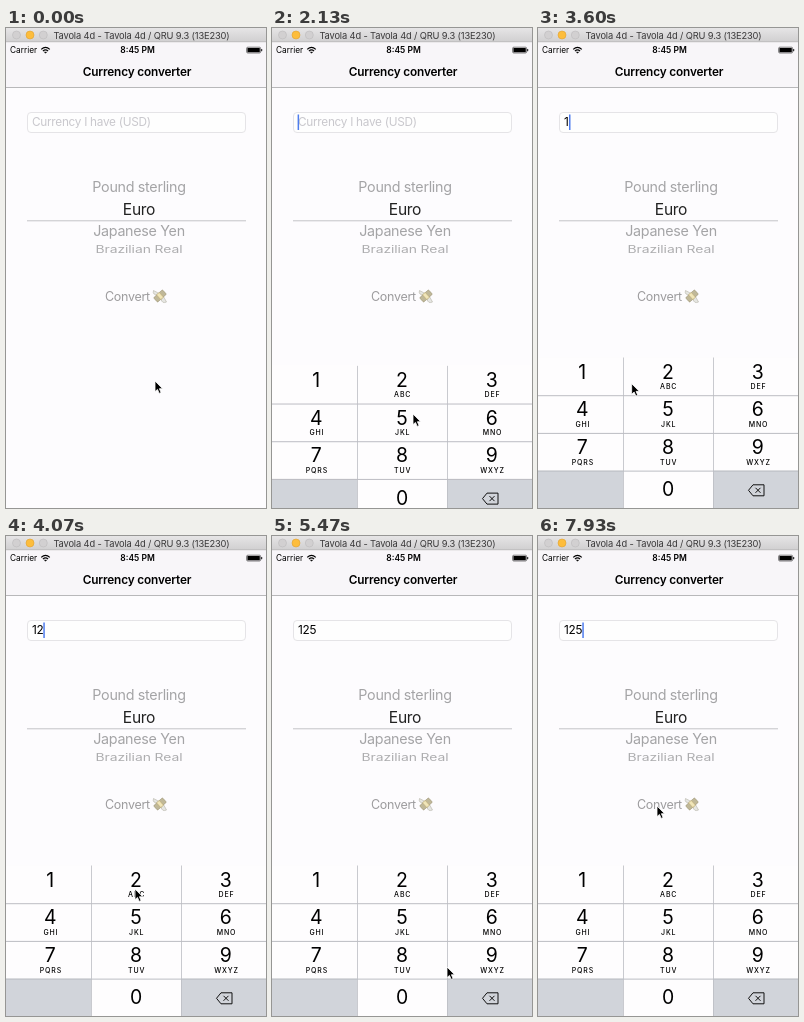
An HTML page for the animation above (8000 ms loop, 260 by 480 pixels).

```html
<!DOCTYPE html>
<html lang="en">
<head>
<meta charset="utf-8">
<title>Currency converter</title>
<style>
html, body { margin: 0; width: 100%; height: 100%; overflow: hidden; background: #fdfcfe; }
svg { display: block; width: 260px; height: 480px; font-family: Inter, Roboto, sans-serif; }
.mid { text-anchor: middle; }
.pick { font-size: 14.3px; letter-spacing: -.3px; fill: #a4a4a6; }
.body { font-size: 11.8px; letter-spacing: -.29px; }
.digit { font-size: 19.4px; }
.letters { font-size: 7px; font-weight: 500; letter-spacing: .85px; }
</style>
</head>
<body>
<svg viewBox="0 0 260 480">
  <defs>
    <linearGradient id="chrome" x2="0" y2="1">
      <stop stop-color="#e6e5e6"/><stop offset="1" stop-color="#d0cfd0"/>
    </linearGradient>
  </defs>
  <rect width="260" height="480" fill="#fdfcfe"/>

  <!-- window and navigation bars -->
  <rect y="14" width="260" height="45" fill="#f8f6f9"/>
  <rect y="59" width="260" height="1" fill="#b8b8ba"/>
  <rect width="260" height="14" fill="url(#chrome)"/>
  <rect y="13.5" width="260" height=".7" fill="#b4b3b4"/>
  <g stroke-width=".6">
    <circle cx="10.5" cy="7" r="4" fill="#d2d0d1" stroke="#bdbbbc"/>
    <circle cx="24" cy="7" r="4" fill="#fdbd3c" stroke="#dfa133"/>
    <circle cx="37.3" cy="7" r="4" fill="#d2d0d1" stroke="#bdbbbc"/>
  </g>
  <text class="mid" x="135.5" y="10.8" font-size="9.3" letter-spacing="-.14" fill="#3a393a">Tavola 4d - Tavola 4d / QRU 9.3 (13E230)</text>
  <text x="4" y="25" font-size="8.3">Carrier</text>
  <g fill="none" stroke="#000" stroke-width="1.2">
    <path d="M35.2 21.4Q39.5 17.5 43.8 21.4M36.9 23.1Q39.5 20.7 42.1 23.1"/>
    <path d="M38.4 24.1L39.5 25.2L40.6 24.1Z" fill="#000" stroke-width=".5"/>
  </g>
  <text class="mid" x="131.5" y="25" font-size="8.5" font-weight="600">8:45 PM</text>
  <rect x="240.6" y="19.2" width="14" height="5.8" rx="1.2" fill="#f8f6f9" stroke="#000" stroke-width=".5"/>
  <rect x="241.4" y="20" width="12.4" height="4.2" rx=".5"/>
  <rect x="255.2" y="21" width="1" height="2.2" rx=".5"/>
  <text class="mid" x="131" y="48.2" font-size="11.8" font-weight="600" letter-spacing="-.15">Currency converter</text>

  <!-- amount field -->
  <rect x="21.5" y="84.5" width="218" height="20" rx="3.5" fill="#fefefe" stroke="#e5e4e7"/>
  <text id="amount" class="body" x="26" y="98.4"></text>
  <rect id="caret" y="86.5" width="1.5" height="15.5" fill="#4f7dee"/>

  <!-- currency picker -->
  <text class="mid pick" x="133" y="164.3">Pound sterling</text>
  <text class="mid" x="133" y="186.5" font-size="15.6" letter-spacing="-.3" fill="#222">Euro</text>
  <rect x="21" y="192.3" width="219" height="1" fill="#c4c3c8"/>
  <text class="mid pick" x="133" y="208">Japanese Yen</text>
  <text class="mid pick" transform="translate(133 225.4) scale(1 .72)" style="font-size:13.9px;letter-spacing:-.08px;fill:#adadaf">Brazilian Real</text>

  <text x="99" y="272.6" font-size="12.5" letter-spacing="-.3" fill="#9d9c9e">Convert</text>
  <g transform="translate(154 268)" stroke-width=".5">
    <path d="M-2-1Q-8-1-6.5-5.5Q-3-4 1-1ZM1 3Q2 8 6.5 6Q5 3 3 0Z" fill="#e6e6e2" stroke="#a9a698"/>
    <g transform="rotate(-42)">
      <rect x="-6" y="-3" width="12" height="6" rx=".8" fill="#c0b898" stroke="#958d70"/>
      <rect x="-1.8" y="-3.2" width="3.6" height="6.4" fill="#f0e5b8" stroke="#bda970"/>
    </g>
  </g>

  <g id="pad"></g>
  <path id="pointer" d="M0 0V10.6L2.5 8.4L4.2 12.4L6.1 11.6L4.4 7.7H7.6Z" fill="#000" stroke="#fff" stroke-width=".8" stroke-linejoin="round"/>
</svg>
<script>
const $ = id => document.getElementById(id);
const FRAME = 200 / 3, COUNT = 120;
const PAD_TOP = 329.5, PAD_HEIGHT = 151, ROW = 37.7, EDGES = [0, 85, 175, 260];
const LETTERS = ['', 'ABC', 'DEF', 'GHI', 'JKL', 'MNO', 'PQRS', 'TUV', 'WXYZ'];

// Pointer path: frame, x, y
const PATH = [
  [0, 149, 353], [1, 148, 358], [6, 148, 358], [8, 141, 386], [40, 141, 386],
  [46, 76, 357], [53, 76, 357], [56, 129, 353], [65, 129, 353], [69, 129, 387],
  [73, 130, 386], [78, 181, 431], [80, 184, 430], [82, 175, 431], [84, 175, 431],
  [91, 144, 268], [93, 144, 268], [97, 119, 270], [120, 119, 270]
];
// Each key lights one frame before its digit appears
const TYPED = [[51, 1], [60, 2], [72, 5]];
const CARET_X = [25.6, 31, 37.3, 44.3];

function buildPad() {
  const rect = (x, y, w, h, fill, id = '') =>
    `<rect ${id && `id="${id}"`} x="${x}" y="${y}" width="${w}" height="${h}" fill="${fill}"/>`;
  const label = (kind, x, y, s) => `<text class="mid ${kind}" x="${x}" y="${y}">${s}</text>`;
  const mids = [44.2, 130, 219.8];
  let out = rect(0, 0, 260, PAD_HEIGHT, '#fefdfe');
  for (const x of [0, 175]) out += rect(x, 3 * ROW, 85, ROW, '#d1d4da');
  LETTERS.forEach((text, i) => {
    const col = i % 3, row = Math.floor(i / 3), y = row * ROW;
    out += rect(EDGES[col], y, EDGES[col + 1] - EDGES[col], ROW, 'none', 'key' + (i + 1));
    out += label('digit', mids[col], y + 21, i + 1) + label('letters', mids[col] + .7, y + 31.6, text);
  });
  out += label('digit', 130, 138.8, 0);
  for (const x of [85, 175]) out += rect(x, 0, .8, PAD_HEIGHT, '#bcbdc3');
  for (const r of [1, 2, 3]) out += rect(0, r * ROW, 260, 1, '#bcbdc3');
  out += '<path d="M210.5 132.8L215 127.3H226V138.3H215ZM217.5 130.3L222.5 135.3M222.5 130.3L217.5 135.3" fill="none" stroke="#111" stroke-linejoin="round"/>';
  $('pad').innerHTML = out;
}

function pointerAt(f) {
  const i = PATH.findIndex(p => p[0] > f);
  const [f0, x0, y0] = PATH[i - 1], [f1, x1, y1] = PATH[i];
  const p = (f - f0) / (f1 - f0);
  return [x0 + (x1 - x0) * p, y0 + (y1 - y0) * p];
}

// Critically damped spring, from hidden to fully raised
function padOffset(f) {
  const s = (f * FRAME - 1880) * .01826;
  if (s < 0) return PAD_HEIGHT;
  return f >= 37 ? 0 : PAD_HEIGHT * (1 + s) * Math.exp(-s);
}

function caretAlpha(f, since) {
  if (f < 29) return 0;
  const d = f - since, phase = d % 15;
  if (phase >= 8) return Math.max(0, 1 - (phase - 7) / 3);
  return d < 15 ? 1 : Math.min(1, (phase + 1) / 3);
}

function draw(now) {
  const f = Math.floor((now + 4) / FRAME) % COUNT;
  const done = TYPED.filter(([at]) => f >= at);
  const text = done.map(k => k[1]).join('');
  $('amount').textContent = text || 'Currency I have (USD)';
  $('amount').setAttribute('fill', text ? '#000' : '#c9c8cd');
  $('caret').setAttribute('x', CARET_X[done.length]);
  $('caret').setAttribute('opacity', caretAlpha(f, done.length ? done[done.length - 1][0] : 27));
  for (const [at, key] of TYPED)
    $('key' + key).setAttribute('fill', f === at || f === at - 1 ? '#d1d4da' : 'none');
  $('pad').setAttribute('transform', `translate(0 ${PAD_TOP + padOffset(f)})`);
  $('pointer').setAttribute('transform', `translate(${pointerAt(f)})`);
  requestAnimationFrame(draw);
}

buildPad();
draw(performance.now());
</script>
</body>
</html>
```
